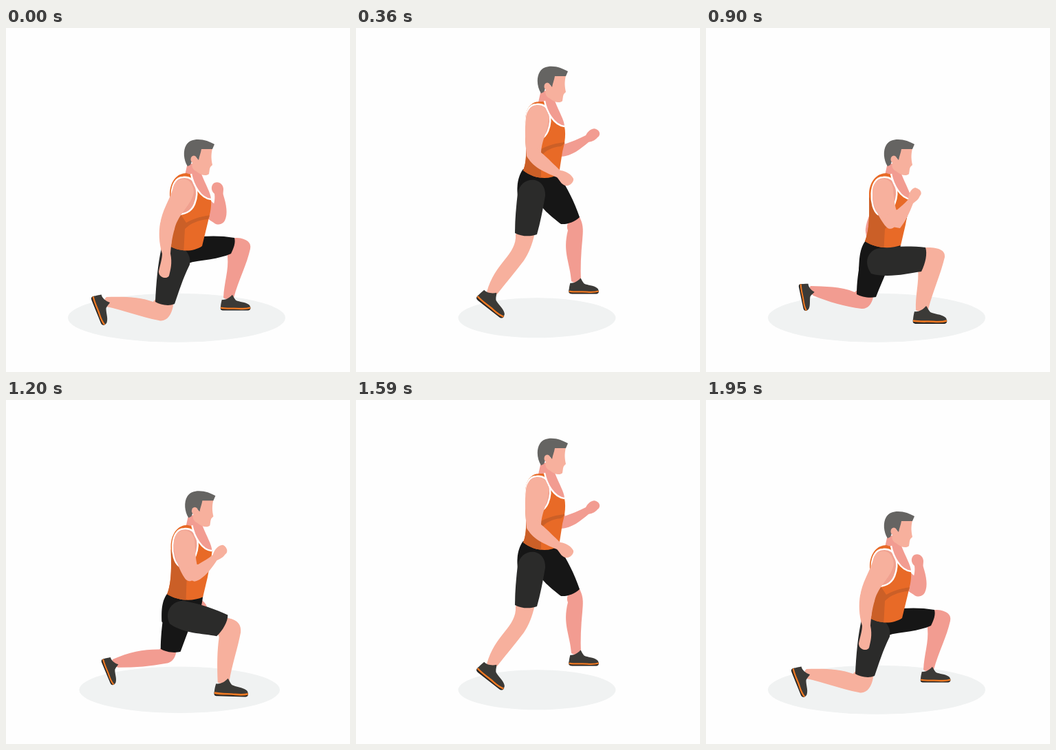
Write an HTML page that moves like this. It is 500 px wide and 500 px high and loops after 2.13 s.

```html
<!DOCTYPE html>
<html lang="en">
<head>
<meta charset="utf-8">
<title>Jumping lunge</title>
<style>
html, body { margin: 0; width: 100%; height: 100%; overflow: hidden; background: #fefefe; }
svg { display: block; width: 100%; height: 100%; }
</style>
</head>
<body>
<svg viewBox="0 0 500 500">
  <defs>
    <clipPath id="shirtClip"><path id="clipShape"/></clipPath>
    <g id="shoe">
      <path fill="#2b2724" d="M-13 13C-14 18 -13 20 -8 20L31 20C35 20 37 18 36 14Z"/>
      <path fill="#3b3a37" d="M-11 2C-6 3 1 0 6 -6C8 -4 9 0 12 3C18 6 28 6 33 10C36 12 36 14 35 15.5L-13 15C-13 10 -12 6 -11 2Z"/>
      <path fill="none" stroke="#f07a24" stroke-width="2.6" d="M-13 15.5C-2 17.5 8 16 17 16.8C25 17.4 31 17 36 15.5"/>
    </g>
  </defs>
  <ellipse id="shadow" fill="#f0f2f2"/>
  <g fill="#f29c91">
    <path id="farUpper"/><path id="farFore"/><path id="farShin"/>
  </g>
  <use id="farShoe" href="#shoe"/>
  <g fill="#161616"><path id="pelvis"/><path id="farThigh"/></g>
  <path id="nearShin" fill="#f7b09d"/>
  <use id="nearShoe" href="#shoe"/>
  <path id="nearThigh" fill="#2b2b2a"/>
  <g class="body">
    <path fill="#f29c91" d="M264 196L260 214L269 214C272 228 283 248 298 249C298 240 290 228 284 212L284 200Z"/>
  </g>
  <path id="shirt" fill="#e86a27"/>
  <g clip-path="url(#shirtClip)">
    <path id="shade" fill="#cb5f27"/>
    <g class="body">
      <path fill="#f0a08f" stroke="#fff" stroke-width="2.5" d="M250 271C237 262 236 217 257 217C277 215 281 238 274 256C269 268 258 271 250 271Z"/>
    </g>
  </g>
  <g class="body">
    <path fill="none" stroke="#fff" stroke-width="2.5" d="M269 212C272 228 283 248 298 249"/>
    <path fill="#f7b09d" d="M283 174L300 175C298 184 298 190 300 199L297 202L296 205L295 212C291 216 283 214 276 208C268 204 270 195 273 193L280 188Z"/>
    <path fill="#656462" d="M264 201C258 192 257 178 262 170C268 160 282 161 292 164C296 166 300 167 303 169L300 176L284 176C283 182 281 186 280 192C276 186 269 186 270 194L268 199Z"/>
    <ellipse cx="273" cy="191" rx="4.5" ry="5.5" fill="#f7b09d"/>
  </g>
  <g fill="#f7b09d"><path id="nearUpper"/><path id="nearFore"/></g>
</svg>
<script>
const $ = id => document.getElementById(id);
const mix = (a, b, f) => a + (b - a) * f;
const mixAll = (a, b, f) => a.map((v, i) => mix(v, b[i], f));
const STEP = 30, LAST = 30, LOOP = 2130;

// Key poses: low lunge, take-off, landing, opposite lunge
const KEY = [0, 12, 19, 30];
const PACE = [0, 0.11, 0.11, 0];
const LIFT = [[0, 0], [5, -106], [5, -102], [0, 0]];

const limbs = [
  {
    ids: ['nearThigh', 'nearShin'],
    joints: [[245,330,232,405,144,396], [255,238,246,302,196,386], [256,242,292,297,303,392], [250,340,325,335,314,410]],
    shapes: [[
      'M226 320C236 306 272 318 267 344C257 364 251 384 245 401C236 405 224 402 217 398C218 372 221 340 226 320Z',
      'M235 240C240 214 276 214 275 244C272 262 268 282 263 300C253 304 240 303 231 298C231 278 233 258 235 240Z',
      'M237 246C234 220 272 220 280 236C290 252 299 270 305 288C298 296 284 300 274 299C263 284 240 268 237 246Z',
      'M240 357C226 336 240 320 254 320C275 317 300 317 319 319C322 328 319 342 313 354C292 357 264 364 240 357Z'
    ], [
      'M214 398C222 385 246 394 243 403C241 418 232 428 222 425C196 420 170 410 146 405C142 400 142 394 146 391C170 390 196 391 214 398Z',
      'M232 300C238 290 258 290 259 302C256 314 252 326 244 338C232 354 218 370 205 387C201 389 194 387 190 384C202 340 234 330 232 300Z',
      'M291 311C276 300 284 286 306 291C313 303 312 318 312 332C310 352 308 372 309 391C306 394 298 394 295 391C293 362 277 338 291 311Z',
      'M308 350C306 330 310 318 322 319C340 319 348 324 347 333C341 358 330 382 323 409C318 413 310 413 305 410C304 388 310 370 308 350Z'
    ]],
    shoe: 'nearShoe',
    foot: [[68, 0.9], [38, 0.98], [6, 1], [0, 1]]
  },
  {
    ids: ['farThigh', 'farShin'],
    joints: [[268,325,338,317,323.5,393], [275,235,314,282,321,369], [262,245,254,304,205,377], [246,335,232,392,152,380]],
    shapes: [[
      'M262 342C250 322 266 304 284 303C300 302 316 302 332 305C334 312 331 320 327 328C310 336 285 337 262 342Z',
      'M262 246C254 214 284 206 295 214C307 232 317 252 325 275C318 282 306 286 298 285C284 274 266 260 262 246Z',
      'M240 245C240 222 284 222 286 246C283 262 276 284 270 304C262 308 248 306 239 300C239 282 240 262 240 245Z',
      'M225 336C230 314 268 322 265 348C258 364 252 378 247 391C238 393 226 391 219 387C219 372 221 354 225 336Z'
    ], [
      'M322 332C322 312 326 304 336 305C350 306 357 312 355 321C350 344 338 366 331 392C326 395 320 395 316 392C317 370 324 352 322 332Z',
      'M308 294C302 280 324 268 326 277C331 288 330 296 329 308C327 328 326 348 327 369C323 371 317 371 313 368C311 340 300 326 308 294Z',
      'M242 305C246 296 264 298 265 306C263 316 258 321 252 327C238 346 226 362 213 379C209 381 203 379 200 376C209 332 230 322 242 305Z',
      'M216 384C224 376 244 382 243 391C241 402 234 409 226 408C202 405 178 398 156 389C150 384 149 378 152 375C172 376 196 375 216 384Z'
    ]],
    shoe: 'farShoe',
    foot: [[0, 0.88], [0, 0.88], [42, 0.85], [78, 0.8]]
  },
  {
    ids: ['nearUpper', 'nearFore'],
    joints: [[258,230,235,286,231,355], [264,128,257,186,306,219], [264,132,267,187,326,175], [256,230,269,286,304,242]],
    shapes: [[
      'M243 232C246 217 270 212 273 238C271 256 250 270 245 292C240 302 224 300 224 286C226 266 238 250 243 232Z',
      'M247 130C250 108 278 106 280 130C280 150 270 160 269 182C268 196 252 196 248 186C246 166 245 148 247 130Z',
      'M249 135C250 112 277 110 280 133C281 150 278 162 279 180C276 194 262 198 257 188C253 176 251 160 249 135Z',
      'M242 236C244 214 271 214 272 235C273 248 274 258 278 268C284 284 270 298 262 289C252 277 241 258 242 236Z'
    ], [
      'M224 284C230 272 246 280 245 292C241 306 240 316 239 328C242 342 239 352 237 360C234 366 222 363 222 354C224 344 227 336 227 328C222 312 222 296 224 284Z',
      'M248 184C250 172 268 172 269 181C280 190 288 199 297 207C306 208 313 213 316 219C317 224 310 231 304 229C298 227 296 221 292 217C276 210 254 202 248 184Z',
      'M257 186C260 174 276 172 279 176C290 176 302 174 313 172C320 166 328 165 335 168C338 172 334 181 330 181C324 184 318 184 313 184C296 194 264 206 257 186Z',
      'M260 287C256 270 272 266 278 264C284 259 290 254 294 249C294 240 299 233 304 232C312 234 315 240 311 244C308 251 304 252 301 255C296 268 290 281 282 291C276 299 266 296 260 287Z'
    ]]
  },
  {
    ids: ['farUpper', 'farFore'],
    joints: [[275,235,309,276,307,234], [281,128,295,178,345,156], [281,132,285,192,321,220], [263,234,241,293,268,335]],
    shapes: [[
      'M266 240C266 228 282 226 286 236C294 250 304 256 316 268C322 282 310 290 302 283C288 274 272 262 266 240Z',
      'M268 130C268 118 288 118 292 130C298 145 303 158 304 172C302 190 286 190 282 178C274 160 268 148 268 130Z',
      'M268 134C268 122 288 122 292 134C296 150 300 168 297 184C294 202 276 204 272 190C268 170 268 150 268 134Z',
      'M252 240C252 226 270 226 274 238C270 258 256 276 252 296C248 306 232 304 232 294C232 278 244 260 252 240Z'
    ], [
      'M318 280C312 290 298 286 300 262C303 254 304 248 303 241C297 236 298 228 303 225C310 222 316 228 316 234C316 238 315 241 316 243C320 256 323 270 318 280Z',
      'M298 187C286 188 284 172 300 170C312 166 324 161 334 156C338 149 344 145 349 147C356 150 355 157 351 159C347 164 342 165 338 166C326 176 314 186 298 187Z',
      'M272 196C274 176 294 184 297 193C303 201 309 207 314 211C321 210 327 213 329 219C330 224 328 230 324 229C318 228 314 225 310 221C300 214 280 207 272 196Z',
      'M232 296C230 282 250 284 253 294C257 303 260 310 263 317C270 322 276 328 276 334C277 340 272 346 266 344C260 342 254 336 250 330C240 320 233 308 232 296Z'
    ]]
  }
];

const trunk = {
  shirt: [
    'M238 240C239 222 249 211 262 211L269 213C272 228 283 248 298 249C299 262 296 272 293 284L285 317C270 327 252 324 240 318C243 295 238 270 238 240Z',
    'M246 140C245 120 252 107 267 107L274 107C277 122 288 142 303 143C306 158 302 172 300 180L295 212C280 222 258 219 243 207C250 190 246 170 246 140Z',
    'M246 145C246 125 253 111 267 111L274 111C277 126 288 146 304 147C306 162 303 176 300 190L294 214C280 225 258 223 242 215C249 196 247 170 246 145Z',
    'M237 240C238 222 249 211 262 211L269 213C272 228 283 248 298 249C295 262 292 274 290 286L283 316C268 321 248 321 231 310C239 290 237 262 237 240Z'
  ],
  shade: [
    'M228 232L262 283C275 276 287 273 300 272L293 278C280 279 268 284 260 292L258 330L222 330Z',
    'M233 126L267 177C280 170 292 167 305 166L298 172C285 173 276 178 269 186L269 224L227 224Z',
    'M233 130L267 181C280 174 292 171 305 170L298 176C285 177 276 182 269 190L269 228L227 228Z',
    'M228 232L262 283C275 276 287 273 300 272L293 278C280 279 268 284 260 292L258 330L222 330Z'
  ],
  pelvis: [
    'M228 318C224 330 223 340 228 346C240 350 256 349 266 342C282 336 288 320 285 308Z',
    'M243 205C232 220 234 240 236 250C255 262 285 255 300 235C298 225 296 215 293 210Z',
    'M243 210C232 222 234 240 237 250C255 262 280 260 288 248C292 236 294 222 294 212Z',
    'M232 309C222 322 223 340 222 352C236 366 260 360 268 345C280 335 282 325 283 314Z'
  ]
};

const NUM = /-?[\d.]+/g;
const numbers = d => d.match(NUM).map(Number);
const fill = (d, values) => { let i = 0; return d.replace(NUM, () => values[i++].toFixed(2)); };

// Turn each pair of coordinates, then shift by (x, y)
function place(values, angle, x, y) {
  const c = Math.cos(angle), s = Math.sin(angle), out = [];
  for (let i = 0; i < values.length; i += 2) {
    const px = values[i], py = values[i + 1];
    out.push(px * c - py * s + x, px * s + py * c + y);
  }
  return out;
}
const shift = (values, x, y) => place(values, 0, x, y);

for (const limb of limbs) {
  limb.root = limb.joints.map((j, p) => [j[0] - LIFT[p][0], j[1] - LIFT[p][1]]);
  limb.bones = limb.shapes.map((paths, k) => paths.map((d, p) => {
    const [x, y, x2, y2] = limb.joints[p].slice(k * 2, k * 2 + 4);
    const angle = Math.atan2(y2 - y, x2 - x);
    const outline = place(shift(numbers(d), -x, -y), -angle, 0, 0);
    return { angle, size: Math.hypot(x2 - x, y2 - y), outline };
  }));
}
const trunkPoints = {};
for (const id in trunk)
  trunkPoints[id] = trunk[id].map((d, p) => shift(numbers(d), -LIFT[p][0], -LIFT[p][1]));

function hermite(a, b, va, vb, span, f) {
  const g = 1 - f;
  return a * g * g * (1 + 2 * f) + b * f * f * (3 - 2 * f) + span * f * g * (va * g - vb * f);
}

const arc = i => 39 + 1.55 * (i - 15.3) ** 2;
const arcSpeed = i => 3.1 * (i - 15.3);

// Top of the head: push off, free flight, sink
function headTop(i) {
  if (i < 12) return hermite(162, arc(12), 0, arcSpeed(12), 12, i / 12);
  if (i <= 19) return arc(i);
  return hermite(arc(19), 162, arcSpeed(19), 0, 11, (i - 19) / 11);
}

function turn(a, b, f) {
  const d = b - a;
  return a + Math.atan2(Math.sin(d), Math.cos(d)) * f;
}

function drawLimb(limb, p, f, ox, oy) {
  let [x, y] = mixAll(limb.root[p], limb.root[p + 1], f);
  x += ox;
  y += oy;
  limb.bones.forEach((bone, k) => {
    const a = bone[p], b = bone[p + 1];
    const angle = turn(a.angle, b.angle, f), size = mix(a.size, b.size, f);
    const outline = place(mixAll(a.outline, b.outline, f), angle, x, y);
    $(limb.ids[k]).setAttribute('d', fill(limb.shapes[k][0], outline));
    x += size * Math.cos(angle);
    y += size * Math.sin(angle);
  });
  if (limb.shoe) {
    const [tilt, scale] = mixAll(limb.foot[p], limb.foot[p + 1], f);
    $(limb.shoe).setAttribute('transform', `translate(${x} ${y}) rotate(${tilt}) scale(${scale})`);
  }
}

function draw(i) {
  const p = i < KEY[1] ? 0 : i < KEY[2] ? 1 : 2;
  const span = KEY[p + 1] - KEY[p];
  const f = hermite(0, 1, PACE[p], PACE[p + 1], span, (i - KEY[p]) / span);
  const oy = headTop(i) - 162, rise = -oy / 106, ox = 5 * Math.min(1, rise);

  const shadow = { cx: 248 + 15 * Math.min(1, rise), cy: 421.3, rx: 158 - 43.5 * rise, ry: 35.5 - 6.5 * rise };
  for (const name in shadow) $('shadow').setAttribute(name, shadow[name]);

  for (const limb of limbs) drawLimb(limb, p, f, ox, oy);
  for (const id in trunk) {
    const points = trunkPoints[id];
    $(id).setAttribute('d', fill(trunk[id][0], shift(mixAll(points[p], points[p + 1], f), ox, oy)));
  }
  $('clipShape').setAttribute('d', $('shirt').getAttribute('d'));
  for (const g of document.querySelectorAll('.body')) g.setAttribute('transform', `translate(${ox} ${oy})`);
}

// There, a rest, back again, a rest
function poseAt(t) {
  const ahead = Math.floor(t / STEP);
  const back = LAST - 1 - Math.floor((t - 1080) / STEP);
  return t < 1080 ? Math.min(LAST, ahead) : Math.max(0, back);
}

const start = performance.now();
function tick() {
  draw(poseAt((performance.now() - start) % LOOP));
  requestAnimationFrame(tick);
}
tick();
</script>
</body>
</html>
```
